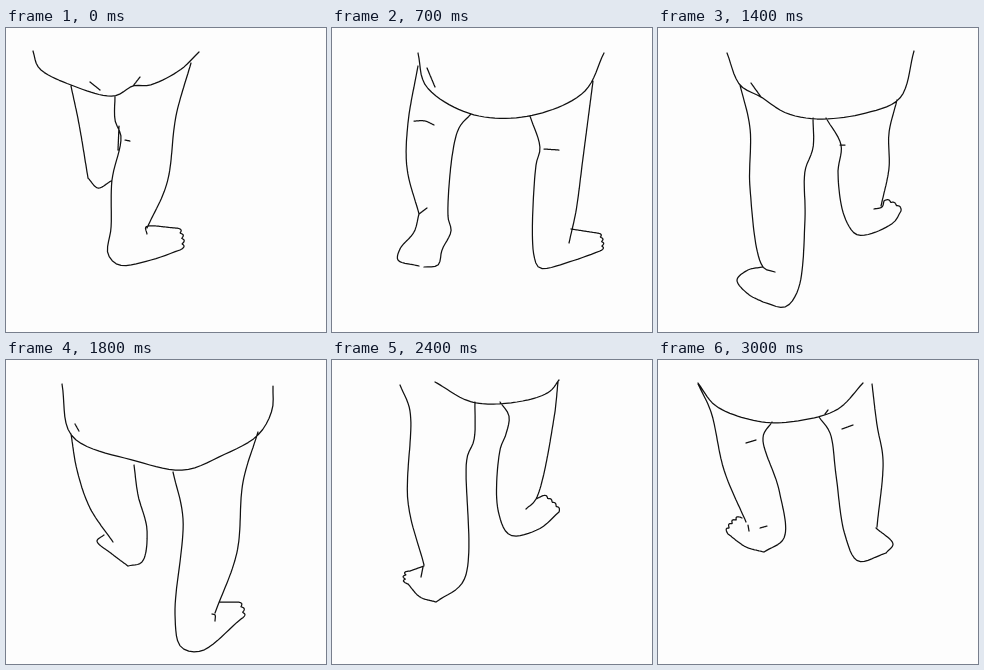
An HTML page for the animation above (3100 ms loop, 320 by 304 pixels).

```html
<!DOCTYPE html>
<html lang="en">
<head>
<meta charset="utf-8">
<title>Toddler walk</title>
<style>
html, body { margin: 0; width: 100%; height: 100%; overflow: hidden; background: #fdfdfd; }
svg { display: block; width: 100vw; height: 100vh; }
path { fill: none; stroke: #111; stroke-width: 1.25; stroke-linecap: round; stroke-linejoin: round; }
</style>
</head>
<body>
<svg viewBox="0 0 320 304"><path id="ink"/></svg>
<script>
const LOOP = 3100, STEP = 100, SAMPLES = 48;
const ink = document.getElementById('ink');
const mix = (p, q, u) => p.map((v, k) => v + (q[k] - v) * u);
const gap = (p, q) => Math.hypot(q[0] - p[0], q[1] - p[1]);

// Points spread evenly along a polyline.
function spread(line) {
  const dist = [0];
  for (let i = 1; i < line.length; i++) dist.push(dist[i - 1] + gap(line[i - 1], line[i]));
  const total = dist[dist.length - 1], out = [];
  for (let n = 0, i = 1; n < SAMPLES; n++) {
    const d = total * n / (SAMPLES - 1);
    while (i < line.length - 1 && dist[i] < d) i++;
    out.push(mix(line[i - 1], line[i], Math.min(1, (d - dist[i - 1]) / (dist[i] - dist[i - 1] || 1))));
  }
  return out;
}

// Centripetal spline through a few x, y key points.
function curve(...flat) {
  const p = [], line = [];
  for (let i = 0; i < flat.length; i += 2) p.push([flat[i], flat[i + 1]]);
  const h = p.slice(1).map((q, i) => Math.sqrt(gap(p[i], q)));
  const slope = (i, k) => (p[i + 1][k] - p[i][k]) / h[i];
  const tangent = (i, k) => {
    if (i === 0) return slope(0, k);
    if (i === h.length) return slope(i - 1, k);
    return (slope(i - 1, k) * h[i] + slope(i, k) * h[i - 1]) / (h[i - 1] + h[i]);
  };
  h.forEach((len, i) => {
    for (let u = 0; u < 1; u += 1 / 16) {
      const s = u * u * (3 - 2 * u);
      line.push([0, 1].map(k => p[i][k] + (p[i + 1][k] - p[i][k]) * s +
        len * u * (1 - u) * (tangent(i, k) * (1 - u) - tangent(i + 1, k) * u)));
    }
  });
  line.push(p[p.length - 1]);
  return spread(line);
}

// A row of round bumps between two points.
function toes(x0, y0, x1, y1, count, size) {
  const len = Math.hypot(x1 - x0, y1 - y0);
  const nx = (y1 - y0) / len * size, ny = (x0 - x1) / len * size;
  return spread(Array.from({ length: count * 10 + 1 }, (_, i) => {
    const u = i / (count * 10);
    const out = Math.sqrt(Math.sin(Math.PI * u)) * 0.6 + Math.abs(Math.sin(Math.PI * u * count)) * 0.4;
    return [x0 + (x1 - x0) * u + nx * out, y0 + (y1 - y0) * u + ny * out];
  }));
}

function blend(a, b, u) {
  const out = {};
  for (const name in { ...a, ...b }) {
    const from = a[name], to = b[name], near = u < 0.5 ? from : to;
    if (from && to) out[name] = from.map((p, i) => mix(p, to[i], u));
    else if (near) out[name] = near;
  }
  return out;
}

function stretch(pose, sx, sy, dx = 0) {
  const out = {};
  for (const name in pose) {
    out[name] = pose[name].map(([x, y]) => [170 + (x - 170) * sx + dx, 24 + (y - 24) * sy]);
  }
  return out;
}

// l, r: leg; O outer side, I inner side, F foot, T toes, A and B ankle, C and K knee.
const start = {
  hip: curve(27,23, 33,40, 65,57, 108,68, 127,58, 144,57, 174,42, 193,24),
  fold: curve(84,54, 94,62),
  fold2: curve(134,49, 127,58),
  lO: curve(65,58, 73,96, 82,150),
  lF: curve(82,150, 92,160, 105,153),
  lI: curve(113,98, 112,122),
  rI: curve(109,68, 109,92, 115,109, 106,152, 105,200, 102,226, 113,237, 145,232, 174,222),
  rF: curve(141,206, 140,199, 170,200),
  rT: toes(170,200, 174,222, 4, 6),
  rO: curve(185,35, 170,88, 161,155, 141,200),
  rC: curve(119,112, 124,113)
};
const wide = {
  hip: curve(86,25, 94,58, 139,86, 197,88, 252,64, 272,25),
  fold: curve(95,40, 103,59),
  lO: curve(86,38, 76,95, 75,140, 87,186),
  lA: curve(87,186, 95,180),
  lF: curve(87,186, 82,204, 68,221, 66,232, 87,238),
  lI: curve(139,86, 126,102, 116,188, 119,203, 110,222, 106,237, 92,239),
  lC: curve(82,93, 93,93, 102,97),
  rI: curve(198,88, 208,120, 204,137, 202,228, 208,240, 240,233, 268,223),
  rF: curve(239,201, 265,205),
  rT: toes(265,205, 268,223, 4, 5),
  rO: curve(261,53, 251,130, 244,183, 237,215),
  rC: curve(212,121, 227,122)
};
const leftUp = {
  hip: curve(76,25, 90,59, 126,74, 178,78, 204,61, 240,46, 248,25),
  lO: curve(90,59, 96,100, 98,143, 114,183, 121,184),
  lA: curve(111,176, 109,186),
  lF: curve(108,177, 94,182, 97,195, 118,212),
  lI: curve(154,78, 143,97, 143,180, 137,210, 118,212),
  rI: curve(174,78, 191,127, 186,165, 185,235, 198,265, 265,258),
  rF: curve(225,229, 257,236),
  rT: toes(257,236, 265,258, 4, 5),
  rO: curve(243,38, 239,100, 238,170, 224,231)
};
const rightUp = {
  hip: curve(69,25, 82,57, 103,69, 128,85, 160,91, 208,85, 242,70, 256,23),
  fold: curve(93,55, 103,69),
  lO: curve(82,57, 92,100, 92,160, 105,239, 117,244),
  lF: curve(105,239, 90,242, 79,252, 90,266, 105,274),
  lI: curve(155,90, 155,120, 147,143, 147,190, 140,262, 127,279, 105,274),
  rI: curve(168,90, 183,117, 180,145, 187,190, 200,207, 235,195, 243,183),
  rF: curve(216,181, 224,179, 226,173),
  rT: toes(226,173, 243,183, 3, 4),
  rO: curve(239,72, 231,105, 231,140, 223,178),
  rK: curve(182,117, 187,117)
};
const leftUpNear = {
  hip: curve(56,24, 66,76, 130,101, 178,110, 215,96, 252,75, 266,50, 267,26),
  fold: curve(69,64, 73,71),
  lO: curve(65,74, 71,110, 84,148, 107,182),
  lF: curve(98,175, 91,181, 106,194, 122,206),
  lI: curve(128,105, 132,135, 141,170, 136,202, 122,206),
  rI: curve(167,112, 177,159, 169,255, 175,287, 195,291, 235,259),
  rA: curve(206,254, 209,255, 209,261),
  rF: curve(213,242, 230,242),
  rT: toes(230,242, 235,259, 3, 6),
  rO: curve(252,72, 237,122, 231,192, 209,253)
};
const rightUpFar = {
  hip: curve(103,22, 140,42, 185,42, 217,32, 227,20),
  lO: curve(68,25, 78,51, 76,142, 92,205),
  lA: curve(92,206, 78,211),
  lB: curve(91,207, 89,217),
  lF: curve(76,224, 88,237, 104,242),
  lT: toes(76,224, 78,211, 3, 6),
  lI: curve(143,42, 142,80, 135,98, 132,220, 104,242),
  rI: curve(168,42, 177,56, 174,74, 168,90, 166,150, 178,175, 207,169, 227,152),
  rF: curve(204,139, 210,136),
  rT: toes(210,136, 227,152, 4, 4),
  rO: curve(226,22, 222,58, 204,139, 194,149)
};
const end = {
  hip: curve(40,23, 58,46, 105,62, 145,60, 180,49, 205,23),
  lO: curve(40,24, 53,52, 66,110, 88,162),
  lA: curve(90,165, 91,171),
  lB: curve(102,168, 109,166),
  lF: curve(70,174, 88,187, 106,192),
  lT: toes(70,174, 84,158, 4, 6),
  lI: curve(114,62, 105,77, 121,130, 126,178, 106,192),
  lC: curve(88,83, 98,80),
  rI: curve(161,57, 172,73, 178,115, 187,175, 200,201, 228,193),
  rF: curve(218,168, 235,184, 228,193),
  rO: curve(214,24, 219,65, 225,100, 219,167),
  rC: curve(184,69, 195,65),
  rK: curve(167,54, 170,50)
};

// Between single steps both feet pass through a wide stance, nearer or farther.
const keys = [
  [0, start],
  [400, blend(rightUp, rightUpFar, 0.65)],
  [700, wide],
  [1000, leftUp],
  [1200, stretch(wide, 1, 1.11, 1)],
  [1400, rightUp],
  [1600, stretch(wide, 1, 1.17, 6)],
  [1800, leftUpNear],
  [2100, stretch(wide, 1.12, 1.24)],
  [2400, rightUpFar],
  [2700, stretch(blend(leftUp, start, 0.6), 1, 0.98)],
  [3000, end]
];

function draw(now) {
  const t = Math.floor(now % LOOP / STEP) * STEP;
  let i = 0;
  while (i < keys.length - 2 && keys[i + 1][0] <= t) i++;
  const [t0, a] = keys[i], [t1, b] = keys[i + 1];
  const shape = blend(a, b, (t - t0) / (t1 - t0));
  ink.setAttribute('d', Object.values(shape).map(line =>
    'M' + line.map(p => p.map(v => v.toFixed(1)).join(' ')).join('L')).join(''));
}

let began;
function tick(now) {
  began ??= now;
  draw(now - began);
  requestAnimationFrame(tick);
}
draw(0);
requestAnimationFrame(tick);
</script>
</body>
</html>
```
